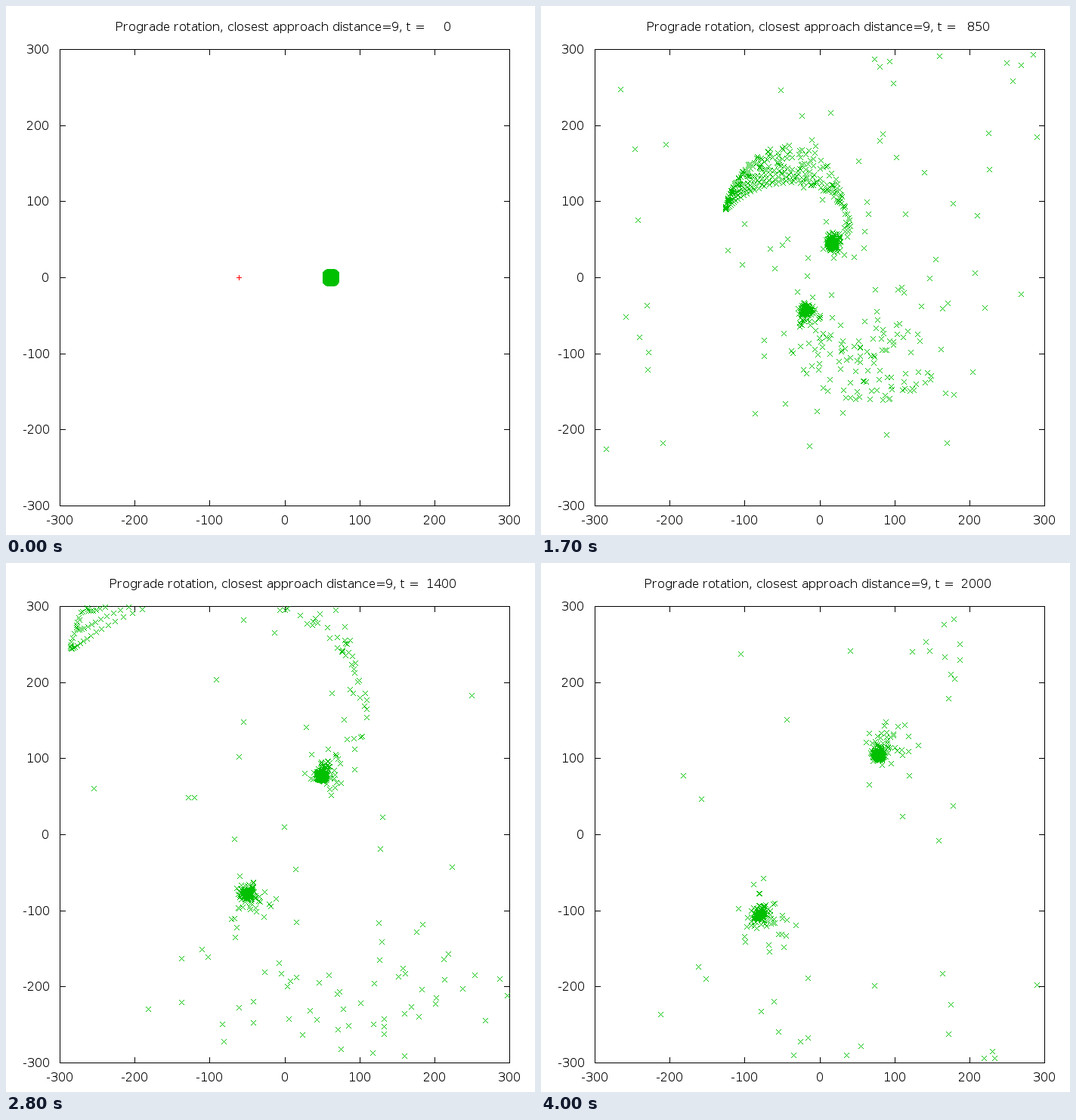
A matplotlib script that plays this animation: 700 px wide and 700 px high, repeating every 4100 ms.

```python
import numpy as np
import matplotlib.pyplot as plt
from matplotlib.animation import FuncAnimation

SIZE, DPI = 700, 100
LEFT, RIGHT, TOP, BOTTOM = 71, 666, 57, 661
FRAMES, INTERVAL = 41, 100
T_FRAME, SUBSTEPS = 50, 400
PERI, START_SEP, MU = 9.0, 122.9, 1.98
SOFT = 0.04
BLACK, GREEN, RED = (0, 0, 0), (0, 192, 0), (255, 0, 0)

# Parabolic encounter of two equal masses (Barker's equation)
K = np.sqrt(2 * PERI ** 3 / MU)
D0 = -np.sqrt(START_SEP / PERI - 1)
T_PERI = -K * (D0 + D0 ** 3 / 3)


def core(t):
    """Place of the disc's own mass; the other mass is its mirror image."""
    d = 2 * np.sinh(np.arcsinh(1.5 * (t - T_PERI) / K) / 3)
    angle = 2 * (np.arctan(D0) - np.arctan(d))
    half = PERI * (1 + d * d) / 2
    return half * np.array([np.cos(angle), np.sin(angle)])


def disc(rings=20, outer=8.0):
    """Rings of test particles on clockwise circular orbits."""
    radius, phase = [], []
    for k in range(2, rings + 1):
        n = 6 * k
        radius.append(np.full(n, outer * k / rings))
        phase.append(2 * np.pi * np.arange(n) / n + 2.4 * k)
    r, a = np.concatenate(radius), np.concatenate(phase)
    speed = r * (r * r + SOFT) ** -0.75
    pos = r * np.array([np.cos(a), np.sin(a)])
    vel = speed * np.array([np.sin(a), -np.cos(a)])
    drift = (core(0.01) - core(-0.01)) / 0.02
    return pos + core(0)[:, None], vel + drift[:, None]


def pull(pos, t):
    c = core(t)[:, None]
    total = 0
    for mass in (c, -c):
        d = mass - pos
        total = total + d / ((d * d).sum(axis=0) + SOFT) ** 1.5
    return total


def simulate():
    pos, vel = disc()
    dt = T_FRAME / SUBSTEPS
    states = [pos]
    for step in range((FRAMES - 1) * SUBSTEPS):
        mid = pos + vel * dt / 2
        vel = vel + pull(mid, (step + 0.5) * dt) * dt
        pos = mid + vel * dt / 2
        if (step + 1) % SUBSTEPS == 0:
            states.append(pos)
    return states


def to_pixel(x, y):
    px = LEFT + (x + 300) * (RIGHT - LEFT) / 600
    py = BOTTOM - (y + 300) * (BOTTOM - TOP) / 600
    return np.floor(px + 0.5).astype(int), np.floor(py + 0.5).astype(int)


def plot_frame():
    """White stage with the box and its inward ticks."""
    img = np.full((SIZE, SIZE, 3), 255, np.uint8)
    img[[TOP, BOTTOM], LEFT:RIGHT + 1] = BLACK
    img[TOP:BOTTOM + 1, [LEFT, RIGHT]] = BLACK
    for v in range(-200, 201, 100):
        x, y = to_pixel(v, v)
        img[TOP:TOP + 8, x] = BLACK
        img[BOTTOM - 7:BOTTOM + 1, x] = BLACK
        img[y, LEFT:LEFT + 8] = BLACK
        img[y, RIGHT - 7:RIGHT + 1] = BLACK
    return img


def paint(index):
    img = background.copy()
    cx, cy = to_pixel(*-core(index * T_FRAME))
    img[cy, cx - 3:cx + 4] = RED
    img[cy - 3:cy + 4, cx] = RED

    pos = states[index]
    x, y = to_pixel(*pos[:, (np.abs(pos) <= 300).all(axis=0)])
    for i in range(-3, 4):
        img[y + i, x + i] = GREEN
        img[y - i, x + i] = GREEN
    return img


states = simulate()
background = plot_frame()

plt.rcParams.update({
    "font.family": "DejaVu Sans",
    "font.size": 16 * 72 / DPI,
    "text.hinting": "native",
    "text.hinting_factor": 1,
})
fig = plt.figure(figsize=(SIZE / DPI, SIZE / DPI), dpi=DPI, facecolor="white")
layer = fig.figimage(paint(0), origin="upper")


def label(x, y, text, align):
    return fig.text(x / SIZE, 1 - y / SIZE, text, ha=align, va="baseline")


for v in range(-300, 301, 100):
    tx, ty = to_pixel(v, v)
    label(tx, 686, str(v), "center")
    label(58 if v < 0 else 57, ty + 6, str(v), "right")
title = label(367, 33, "", "center")


def draw(index):
    layer.set_data(paint(index))
    title.set_text("Prograde rotation, closest approach distance=9, "
                   f"t = {index * T_FRAME:5d}")
    return layer, title


anim = FuncAnimation(fig, draw, frames=FRAMES, interval=INTERVAL,
                     repeat=True, repeat_delay=0)
plt.show()
```
